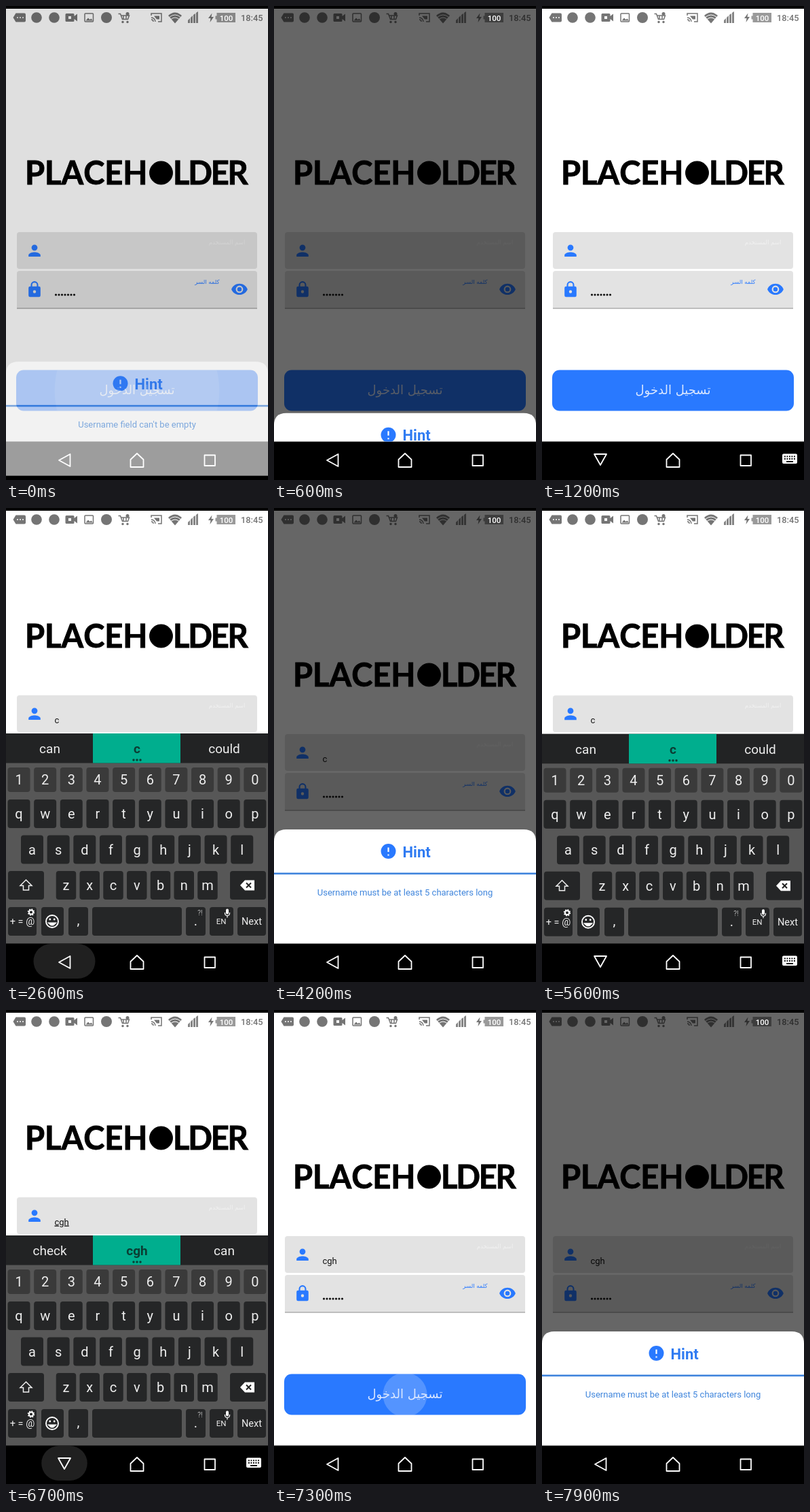
Animation of 386 by 696 pixels, one loop 8000 ms. Source, as an HTML page:

```html
<!DOCTYPE html>
<html lang="en">
<head>
<meta charset="utf-8">
<title>Login form hint</title>
<style>
html, body { margin: 0; height: 100%; overflow: hidden; background: #000; }
svg { display: block; width: 100vw; height: 100vh; font-family: Roboto, sans-serif; }
.ar { font-family: "DejaVu Sans", sans-serif; direction: rtl; }
.mid { text-anchor: middle; }
.logo { font: 700 47px Lato, sans-serif; font-kerning: none; stroke: #000; stroke-width: .9; }
.tight { letter-spacing: -2.2px; }
.line { fill: none; stroke: #fff; stroke-width: 1.8; stroke-linejoin: round; }
</style>
</head>
<body>
<svg viewBox="0 0 386 696">
  <defs>
    <clipPath id="buttonClip"><rect x="15" y="534.500" width="356" height="60" rx="11"/></clipPath>
    <clipPath id="aboveNav"><rect width="386" height="639.500"/></clipPath>
  </defs>
  <rect width="386" height="696" fill="#fff"/>

  <g id="page">
    <g class="logo">
      <text x="28" y="262">PLACEH</text>
      <text class="tight" x="246" y="262">LDER</text>
      <circle cx="228.500" cy="245" r="17"/>
    </g>
    <rect x="16" y="332" width="354" height="54" rx="4" fill="#e3e3e3"/>
    <path d="M16 444V393q0-4 4-4H366q4 0 4 4V444z" fill="#e3e3e3"/>
    <path d="M16 444H370" stroke="#8c8c8c" stroke-width="1.2"/>
    <g fill="#2979ff">
      <path transform="translate(28.8 346) scale(1.1)" d="M12 12a4 4 0 1 0 0-8 4 4 0 0 0 0 8zm0 2c-2.7 0-8 1.3-8 4v2h16v-2c0-2.7-5.3-4-8-4z"/>
      <path transform="translate(28.8 403) scale(1.1)" fill-rule="evenodd" d="M18 8h-1V6A5 5 0 0 0 7 6v2H6a2 2 0 0 0-2 2v10a2 2 0 0 0 2 2h12a2 2 0 0 0 2-2V10a2 2 0 0 0-2-2zm-6 9a2 2 0 1 1 0-4 2 2 0 0 1 0 4zM8.9 8V6a3.1 3.1 0 0 1 6.2 0v2z"/>
      <path transform="translate(331 403) scale(1.08)" fill-rule="evenodd" d="M12 4.500C7 4.500 2.700 7.600 1 12c1.700 4.400 6 7.500 11 7.500s9.300-3.100 11-7.500C21.300 7.600 17 4.500 12 4.500zM12 17a5 5 0 1 1 0-10 5 5 0 0 1 0 10zm0-2a3 3 0 1 0 0-6 3 3 0 0 0 0 6z"/>
      <text class="ar mid" x="296.500" y="408" font-size="8.500">كلمه السر</text>
    </g>
    <text class="ar mid" x="325.500" y="350" font-size="8.600" fill="#f1f1f1">اسم المستخدم</text>
    <text id="user" x="71.500" y="372.500" font-size="13" fill="#111"></text>
    <path d="M73.500 424H101" stroke="#111" stroke-width="3.200" stroke-linecap="round" stroke-dasharray="0 4.500"/>
    <g clip-path="url(#buttonClip)">
      <rect x="15" y="534" width="356" height="61" fill="#2979ff"/>
      <circle id="buttonRipple" cx="193" cy="565" fill="#fff"/>
    </g>
    <text class="ar mid" x="193" y="570" font-size="18" fill="#dce8ff">تسجيل الدخول</text>
  </g>

  <g fill="#757575">
    <path d="M10.500 17l4-6.500H27q2 0 2 2v9q0 2-2 2H14.500z"/>
    <path d="M17 17H26" stroke="#fff" stroke-width="2" stroke-linecap="round" stroke-dasharray="0 4"/>
    <circle cx="45" cy="17" r="7.800"/><circle cx="71" cy="17" r="7.800"/><circle cx="148" cy="17" r="8"/>
    <path fill-rule="evenodd" d="M89 11H99q1.500 0 1.500 1.500V15l4.500-3.500v11L100.500 19v2.500q0 1.500-1.500 1.500H89q-1.500 0-1.500-1.500v-9Q87.500 11 89 11zm3 4v4h4v-4z"/>
    <path d="M117.500 21.500l3.500-4 2.500 2.500 2-1.500 2.500 3z"/>
    <g fill="none" stroke="#757575" stroke-width="1.500">
      <rect x="116" y="11" width="12.500" height="12" rx="1"/>
      <path d="M165.500 11.500h3l3 8h8l2-5.500H170M173 14v5m4-5v5"/>
      <path d="M214 14v-3h15v12h-5M214 17a6 6 0 0 1 6 6M214 20a3 3 0 0 1 3 3"/>
    </g>
    <circle cx="172" cy="23.500" r="1.700"/><circle cx="179" cy="23.500" r="1.700"/><circle cx="179" cy="11.500" r="2.500"/>
    <path d="M218 14.500h8v5h-4z"/>
    <path d="M249 25.500L239 14q10-9 20 0z"/>
    <path d="M240.500 16.500q8.500-7 17 0M243 19.500q6-5 12 0" fill="none" stroke="#fff"/>
    <path d="M268 25v-4l3-3v7zm4 0v-8l3-3v11zm4 0V13l3-2v14zm4 0V10l3-2v17z" fill="#858585"/>
    <path d="M303.500 10.500l-5.500 7.500h3.500l-1 6 5.500-8h-3.500z"/>
    <path d="M308.500 14.500h2v-4.500H338v14H310.500v-4.500h-2z" fill="#9a9a9a"/>
    <text x="346" y="22" font-size="12.800" font-weight="500">18:45</text>
  </g>

  <g id="keyboard"></g>
  <rect id="dim" y="4" width="386" height="636"/>
  <text x="324.500" y="21.500" class="mid" font-size="11.500" font-weight="500" fill="#fff">100</text>

  <g>
    <rect y="639.500" width="386" height="56.500"/>
    <rect id="navRipple" y="640" height="51" rx="25.500" fill="#202020"/>
    <path id="back" class="line" d="M78 667L94.500 658V676z"/>
    <g id="down">
      <path class="line" d="M77 658H95L86 674z"/>
      <rect x="354" y="657.500" width="22" height="14.500" rx="2" fill="#fff"/>
      <path d="M357 661.500H374M357 665H374" stroke="#000" stroke-width="1.800" stroke-dasharray="1.800 1.700"/>
      <path d="M360 669H370" stroke="#000" stroke-width="1.800"/>
    </g>
    <path class="line" d="M183.500 666L193 657L202.500 666V677H183.500z"/>
    <rect class="line" x="292.500" y="659.500" width="15.500" height="15.500"/>
  </g>

  <g id="sheetClip"><g id="sheet">
    <path d="M0 639.500V490q0-18 18-18H368q18 0 18 18V639.500z" fill="#fff"/>
    <circle cx="168.500" cy="504" r="11" fill="#2979ff"/>
    <path d="M168.500 498.500v6.500m0 3.500v2" stroke="#fff" stroke-width="2.200"/>
    <text x="189.500" y="512.500" font-size="22" font-weight="700" fill="#2f7bf2">Hint</text>
    <rect y="535.500" width="386" height="2.600" fill="#3f84dc"/>
    <text id="message" class="mid" x="193" y="569" font-size="13" fill="#3f85dc"></text>
  </g></g>
  <path d="M0 0H386V4H0zM0 691H386V696H0z"/>
</svg>

<script>
const $ = id => document.getElementById(id);
const set = (id, attrs) => { for (const k in attrs) $(id).setAttribute(k, attrs[k]); };
const ramp = (t, from, length) => Math.min(1, Math.max(0, (t - from) / length));
const within = (t, from, to) => t >= from && t < to;

const LOOP = 8000;
const TOO_SHORT = 'Username must be at least 5 characters long';
const SHEETS = [
  { open: -100, length: 164, close: 350, message: "Username field can't be empty" },
  { open: 3500, length: 100, close: 4750, message: TOO_SHORT },
  { open: 7460, length: 164, close: 9999, message: TOO_SHORT }
];
const BUTTON_PRESSES = [-450, 2980, 7180];
const KEY_PRESSES = [['c', 1980], ['g', 5980], ['h', 6180]];
const KEYBOARDS = [
  { focus: 1080, open: 1220, press: 2480, arrow: 2560, close: 2610 },
  { focus: 5380, open: 5430, press: 6630, arrow: 6760, close: 6730 }
];
const TYPED = [
  [6200, 'cgh', 'check', 'can'],
  [6000, 'cg', 'check', 'could'],
  [2050, 'c', 'can', 'could'],
  [0, '', '', '']
];

function buildKeyboard() {
  const label = (x, y, s, size = 20, extra = '') =>
    `<text class="mid" x="${x}" y="${y}" font-size="${size}" fill="#eee" ${extra}>${s}</text>`;
  const box = (x, y, w, h = 42, fill = '#252627', id = '') =>
    `<rect ${id && `id="key-${id}"`} x="${x}" y="${y}" width="${w}" height="${h}" rx="4" fill="${fill}"/>`;
  const row = (keys, x, y, step, w, h, fill) => [...keys].map((k, i) =>
    box(x + i * step - w / 2, y, w, h, fill, k) + label(x + i * step, y + h / 2 + 7, k)).join('');

  $('keyboard').innerHTML =
    '<rect y="331" width="386" height="309" fill="#575757"/><rect y="331" width="386" height="43.500" fill="#222324"/>' +
    '<g id="choice"><rect x="128" y="331" width="129" height="43.500" fill="#00ae8e"/>' +
    '<path d="M188 370H199" stroke="#0b3d34" stroke-width="3.500" stroke-linecap="round" stroke-dasharray="0 5"/></g>' +
    label(64.5, 360, '', 19, 'id="left"') + label(321.5, 360, '', 19, 'id="right"') +
    '<text id="word" class="mid" x="193" y="360" font-size="19" font-weight="700" fill="#0b3d34"></text>' +
    row('1234567890', 19, 381, 38.65, 33, 36, '#3a3a3a') +
    row('qwertyuiop', 19, 428, 38.65, 33, 42) +
    row('asdfghjkl', 38.5, 480.5, 38.65, 33, 42) +
    row('zxcvbnm', 88.5, 533, 34.75, 29.5, 42) +
    [[3, 53], [330, 53]].map(([x, w]) => box(x, 533, w)).join('') +
    [[3, 42], [52, 33], [92, 29], [127, 132], [265, 29], [300, 35], [341, 42]].map(([x, w]) => box(x, 586, w)).join('') +
    '<path d="M29.500 546L38 554.500H33.500V561H25.500V554.500H21z" fill="none" stroke="#eee" stroke-width="1.500"/>' +
    '<path d="M345 554L352 546.500H366V561.500H352z" fill="#fff"/>' +
    '<path d="M354 550.500l7 7m0-7l-7 7" stroke="#222" stroke-width="2"/>' +
    '<g fill="none" stroke="#fff" stroke-width="1.900"><circle cx="68" cy="607" r="9"/><path d="M63 609.500q5 6 10 0z" fill="#fff"/>' +
    '<circle cx="37" cy="593.500" r="3"/><circle cx="37" cy="593.500" r="4.300" stroke-dasharray="1.700 1.680"/>' +
    '<path d="M322.500 594v1q0 3.500 3.500 3.500t3.500-3.500v-1M326 598.500v3" stroke-width="1.200"/></g>' +
    '<rect x="324" y="588.500" width="4" height="8" rx="2" fill="#fff"/>' +
    '<circle cx="64.800" cy="604" r="1.400" fill="#fff"/><circle cx="71.200" cy="604" r="1.400" fill="#fff"/>' +
    label(24, 612, '+ = @', 14.5) + label(106.5, 612, ',') + label(279.5, 613, '.') +
    label(286, 598, '?!', 10, 'opacity=".7"') + label(317, 611, 'EN', 11.5) + label(362, 612, 'Next', 14.5);
}

function drawSheet(t) {
  const s = SHEETS.find(s => within(t, s.open, s.close + 450));
  if (!s) {
    set('dim', { opacity: 0 });
    set('sheet', { opacity: 0 });
    return;
  }
  const shown = ramp(t, s.open, s.length), gone = ramp(t, s.close, 290);
  set('dim', { opacity: .6 * shown ** 3.25 * (1 - ramp(t, s.close + 330, 120)) });
  set('sheet', { opacity: shown, transform: `translate(0 ${131 * (1 - shown) + 168 * gone * gone})` });
  set('sheetClip', { 'clip-path': gone ? 'url(#aboveNav)' : 'none' });
  $('message').textContent = s.message;
}

function drawKeyboard(t) {
  const k = KEYBOARDS.find(k => within(t, k.focus, k.close + 400));
  const up = k ? (1 - (1 - ramp(t, k.open, 180)) ** 2) * (1 - ramp(t, k.close, 150)) : 0;
  const down = k && t < k.arrow;
  set('keyboard', { transform: `translate(0 ${309 * (1 - up)})`, opacity: up ? 1 : 0 });
  set('page', { transform: `translate(0 ${-57 * up})` });
  set('down', { opacity: down ? 1 : 0 });
  set('back', { opacity: down ? 0 : 1 });

  const spread = k ? 57 * Math.min(1, .3 + ramp(t, k.press, 170) * .7) : 0;
  set('navRipple', {
    x: 86 - spread, width: 2 * spread,
    opacity: k && t >= k.press ? 1 - ramp(t, k.press + 200, 150) : 0
  });

  const [, word, left, right] = TYPED.find(s => t >= s[0]);
  $('user').textContent = $('word').textContent = word;
  $('left').textContent = left;
  $('right').textContent = right;
  set('choice', { opacity: word ? 1 : 0 });
  set('user', { 'text-decoration': up && t >= 6000 ? 'underline' : 'none' });
  for (const [key, at] of KEY_PRESSES)
    set('key-' + key, { fill: within(t, at, at + 110) ? '#00ae8e' : '#252627' });
}

function drawButton(t) {
  const start = BUTTON_PRESSES.find(p => within(t, p, p + 550));
  const p = start === undefined ? 0 : (t - start) / 550;
  set('buttonRipple', { r: 148 * p, opacity: .2 * Math.min(1, 3 * (1 - p)) });
}

function frame(now) {
  const t = now % LOOP;
  drawSheet(t);
  drawKeyboard(t);
  drawButton(t);
  requestAnimationFrame(frame);
}

buildKeyboard();
requestAnimationFrame(frame);
</script>
</body>
</html>
```
